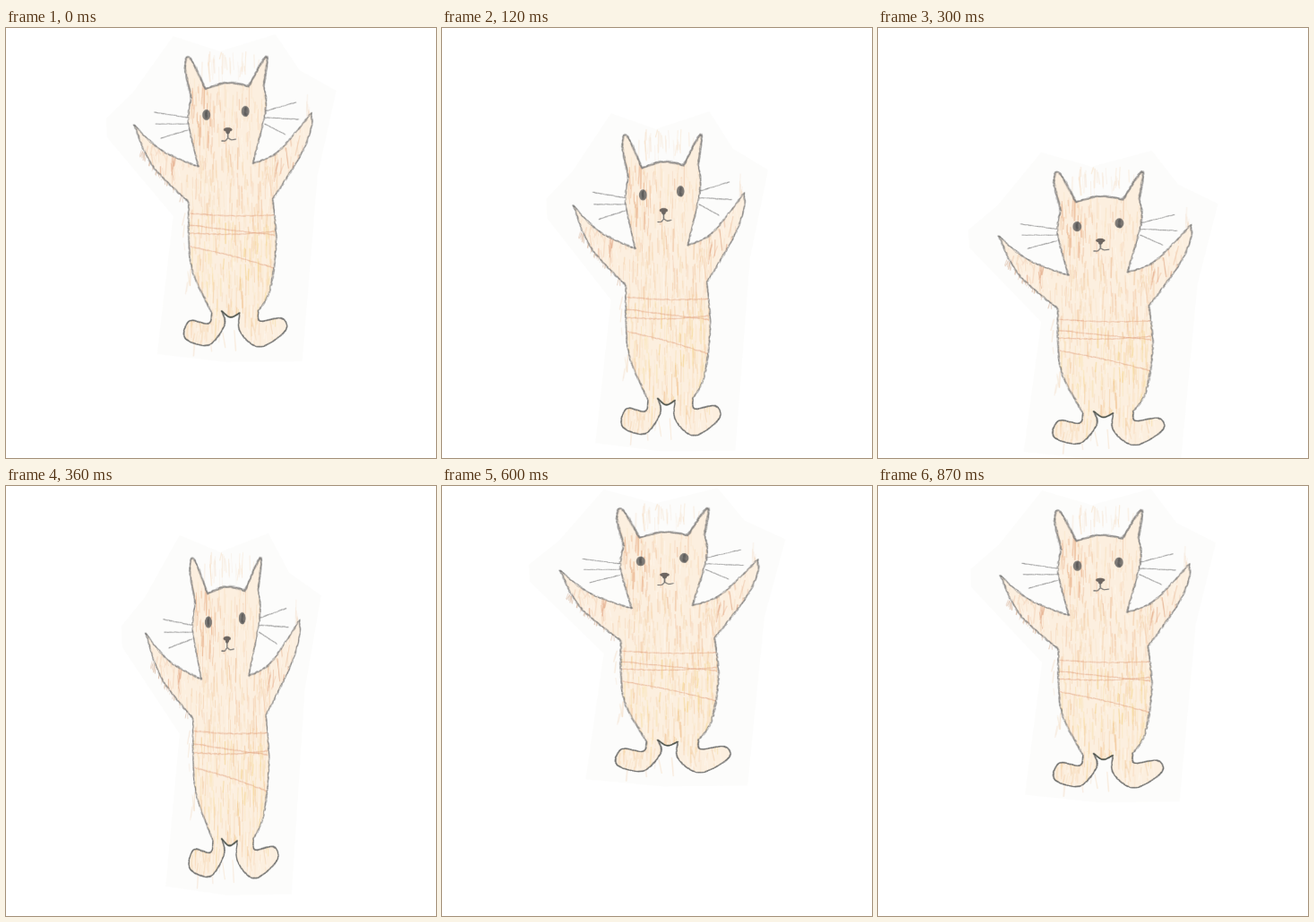
An HTML page with a canvas for the animation above (900 ms loop, 480x480 px).

```html
<!DOCTYPE html>
<html lang="en">
<head>
<meta charset="utf-8">
<title>Bouncing cat</title>
<style>
html, body { margin: 0; width: 100%; height: 100%; overflow: hidden; background: #fff; }
canvas { display: block; width: 480px; height: 480px; }
</style>
</head>
<body>
<canvas id="stage" width="480" height="480"></canvas>
<script>
const LOOP = 900, STEP = 30, DETAIL = 3, SIZE = 400;
const CX = 240, FOOT = 356;

// Poses by time away from the landing: [ms, foot y, scale x, scale y]
const POSES = [
  [15, 472, 1.262, 0.793],
  [105, 455, 0.964, 1.037],
  [135, 438, 0.868, 1.104],
  [225, 356, 1, 1],
  [255, 337, 1.066, 0.957],
  [375, 320, 1.115, 0.911],
  [435, 318, 1.122, 0.906]
];

let seed = 11;
function rnd(a = 0, b = 1) {
  seed = (seed * 1664525 + 1013904223) >>> 0;
  return a + (b - a) * seed / 4294967296;
}

function pick(list) { return list[Math.floor(rnd(0, list.length))]; }

// Dense samples of a smooth curve through x,y pairs
function curve(p) {
  const n = p.length / 2, out = [];
  const at = (i, k) => p[2 * Math.min(n - 1, Math.max(0, i)) + k];
  for (let i = 0; i < n - 1; i++) {
    const len = Math.hypot(at(i + 1, 0) - at(i, 0), at(i + 1, 1) - at(i, 1));
    const cuts = Math.max(3, Math.ceil(len / 2));
    for (let j = 0; j < cuts; j++) {
      const u = j / cuts;
      out.push([0, 1].map(k => {
        const a = at(i - 1, k), b = at(i, k), c = at(i + 1, k), d = at(i + 2, k);
        return b + u / 2 * (c - a + u * (2 * a - 5 * b + 4 * c - d + u * (3 * (b - c) + d - a)));
      }));
    }
  }
  out.push([at(n - 1, 0), at(n - 1, 1)]);
  return out;
}

// Each run starts where the one before it ended
let pen = [206, 78];
function run(...p) {
  const pts = curve([...pen, ...p]);
  pen = p.slice(-2);
  return pts;
}

const earL = run(199,42, 205,34, 222,68);
const crown = run(246,61, 270,65);
const earR = run(290,32, 287,64);
const cheekR = run(289,92, 275,151);
const armR = [run(303,138, 340,95), run(340,112, 328,142, 297,191)];
const sideR = run(301,240, 294,292, 281,316);
const footR = run(283,327, 307,324, 311,338, 283,356, 261,340, 260,318);
const crotch = run(250,323, 240,316);
const footL = run(243,332, 225,354, 199,346, 204,327, 225,330, 229,318);
const sideL = run(206,265, 203,194);
const armL = [run(163,154, 142,108), run(172,136, 214,155)];
const cheekL = run(203,105, 206,78);
const feet = [footR, crotch, footL];
const outline = [earL, crown, earR, cheekR, ...armR, sideR, ...feet, sideL, ...armL, cheekL];

const PAPER = [186,9, 238,26, 300,7, 327,47, 368,70, 347,165, 330,372, 246,373,
  168,364, 186,210, 112,122, 111,101, 141,72];

function trace(g, pts) {
  pts.forEach(([x, y], i) => i ? g.lineTo(x, y) : g.moveTo(x, y));
}

function line(g, x1, y1, x2, y2, color, width, alpha) {
  g.globalAlpha = alpha;
  g.strokeStyle = color;
  g.lineWidth = width;
  g.beginPath();
  g.moveTo(x1, y1);
  g.lineTo(x2, y2);
  g.stroke();
}

// Grainy line built from loose overlapping dashes
function pencil(g, pts, color, width, alpha, loose = 0.5) {
  for (let k = 0; k < 3; k++) {
    for (let i = 1; i < pts.length; i++) {
      const dx = rnd(-loose, loose), dy = rnd(-loose, loose);
      line(g, pts[i - 1][0] + dx, pts[i - 1][1] + dy, pts[i][0] + dx, pts[i][1] + dy,
        color, width * rnd(0.7, 1.2), alpha * rnd(0.4, 1));
    }
  }
}

function hatch(g, count, x, y, w, h, colors, lean = 1) {
  for (let i = 0; i < count; i++) {
    const px = x + rnd(0, w), py = y + rnd(0, h);
    line(g, px, py, px + rnd(-1, 1) * lean, py + rnd(6, 24), pick(colors), rnd(0.6, 1.7), rnd(0.25, 0.62));
  }
}

function eye(g, x, y) {
  g.globalAlpha = 0.85;
  g.fillStyle = '#686766';
  g.beginPath();
  g.ellipse(x, y, 4.5, 5.9, 0, 0, Math.PI * 2);
  g.fill();
  pencil(g, curve([x, y - 4, x, y + 4]), '#555', 2, 0.4, 1.4);
}

// Three whiskers fanning out from a cheek
function whiskers(g, x, y, dir, tips) {
  tips.forEach(([len, rise], i) => {
    const y1 = y + 7 * i;
    pencil(g, curve([x, y1, x + dir * len, y1 + rise]), '#858585', 1, 0.4, 0.4);
  });
}

function drawCat() {
  const c = document.createElement('canvas');
  c.width = c.height = SIZE * DETAIL;
  const g = c.getContext('2d');
  g.scale(DETAIL, DETAIL);
  g.lineCap = 'round';

  g.fillStyle = '#fcfcfb';
  g.beginPath();
  for (let i = 0; i < PAPER.length; i += 2) g.lineTo(PAPER[i], PAPER[i + 1]);
  g.fill();

  // Crayon that strays over the edge
  const pale = ['#f6dfc6', '#f5e2d0'];
  hatch(g, 28, 216, 26, 66, 18, pale, 2);
  hatch(g, 7, 332, 70, 8, 26, pale, 2);
  hatch(g, 14, 198, 205, 8, 80, pale, 4);
  hatch(g, 7, 206, 335, 68, 10, pale, 3);
  for (let i = 0; i < 30; i++) {
    const u = rnd(), x = 150 + 48 * u, y = 136 + 52 * u;
    line(g, x, y, x + rnd(-3, 1), y + rnd(3, 9), '#d3a88a', 1, rnd(0.25, 0.6));
  }

  g.globalAlpha = 1;
  const body = new Path2D();
  trace(body, outline.flat());
  g.save();
  g.clip(body);
  g.fillStyle = '#fcefdf';
  g.fillRect(0, 0, SIZE, SIZE);
  const peach = ['#eec2a1', '#f5d5b8', '#fff7ef'], rust = ['#df9f7a'];
  hatch(g, 420, 200, 55, 102, 275, ['#f7dcba', '#f5d2ae', '#f9e3c2']);
  hatch(g, 170, 204, 60, 96, 150, ['#efc09b', '#f3cba6', '#fff8ee']);
  hatch(g, 190, 204, 200, 98, 125, ['#f5d48f', '#f8dfa6', '#f0c08c', '#fff9ec']);
  for (const x of [142, 286]) {
    hatch(g, 85, x, 96, 60, 84, peach, 5);
    hatch(g, 16, x + 11, 110, 36, 48, rust, 3);
  }
  hatch(g, 24, 205, 62, 27, 63, ['#e8ae86']);
  hatch(g, 60, 198, 325, 114, 25, ['#fffaf4', '#f6d9b8'], 3);
  for (const [y, drop] of [[207, 2], [220, 11], [229, -2], [244, 24]]) {
    pencil(g, curve([205, y, 250, y + drop / 3 + 2, 299, y + drop]), '#df9f7d', 1, 0.28, 0.6);
  }
  g.restore();

  for (const pts of outline) {
    if (feet.includes(pts)) pencil(g, pts, '#666766', 1.3, 0.65, 0.45);
    else pencil(g, pts, '#7c7b7a', 1.2, 0.5, 0.85);
  }
  pencil(g, crotch, '#454c43', 1.3, 0.5, 0.4);
  for (const pts of [earL, crown, earR]) pencil(g, pts, '#807e7c', 1.2, 0.3, 1.3);

  whiskers(g, 202, 100, -1, [[37, -6], [36, 0], [30, 9]]);
  whiskers(g, 288, 93, 1, [[35, -10], [38, 2], [23, 12]]);

  eye(g, 223, 97);
  eye(g, 266.5, 93);
  g.globalAlpha = 0.9;
  g.fillStyle = '#5d5753';
  g.beginPath();
  g.ellipse(247, 113.5, 4.8, 2.4, 0, 0, Math.PI * 2);
  g.ellipse(247, 115.5, 2.4, 3, 0, 0, Math.PI * 2);
  g.fill();
  pencil(g, curve([247,117, 247,123]), '#666', 1.2, 0.6, 0.3);
  pencil(g, curve([240,126, 244,126, 247,123, 251,125, 256,124]), '#666', 1.1, 0.55, 0.35);
  return c;
}

// Smooth interpolation between the unevenly spaced poses
function pose(d) {
  const last = POSES.length - 1;
  let i = 0;
  while (i < last - 1 && d > POSES[i + 1][0]) i++;
  const a = POSES[i], b = POSES[i + 1], h = b[0] - a[0];
  const u = Math.min(1, Math.max(0, (d - a[0]) / h));
  const slope = (j, k) => (POSES[j + 1][k] - POSES[j][k]) / (POSES[j + 1][0] - POSES[j][0]);
  const tangent = (j, k) => {
    if (j === 0 || j === last) return 0;
    const before = POSES[j][0] - POSES[j - 1][0], after = POSES[j + 1][0] - POSES[j][0];
    return (slope(j - 1, k) * after + slope(j, k) * before) / (before + after);
  };
  return [1, 2, 3].map(k => {
    const m = h * tangent(i, k), n = h * tangent(i + 1, k), diff = b[k] - a[k];
    return a[k] + u * (m + u * (3 * diff - 2 * m - n + u * (m + n - 2 * diff)));
  });
}

const ctx = document.getElementById('stage').getContext('2d');
const cat = drawCat();
ctx.imageSmoothingQuality = 'high';

function frame() {
  const t = Math.floor(performance.now() % LOOP / STEP) * STEP;
  // Fall and rise mirror each other around the landing at a quarter of the loop
  const away = Math.abs(t - LOOP / 4);
  const [y, sx, sy] = pose(Math.min(away, LOOP - away));
  ctx.setTransform(1, 0, 0, 1, 0, 0);
  ctx.fillStyle = '#fff';
  ctx.fillRect(0, 0, 480, 480);
  ctx.translate(CX + 0.7, y);
  ctx.scale(sx, sy);
  ctx.drawImage(cat, -CX, -FOOT, SIZE, SIZE);
  requestAnimationFrame(frame);
}
frame();
</script>
</body>
</html>
```
